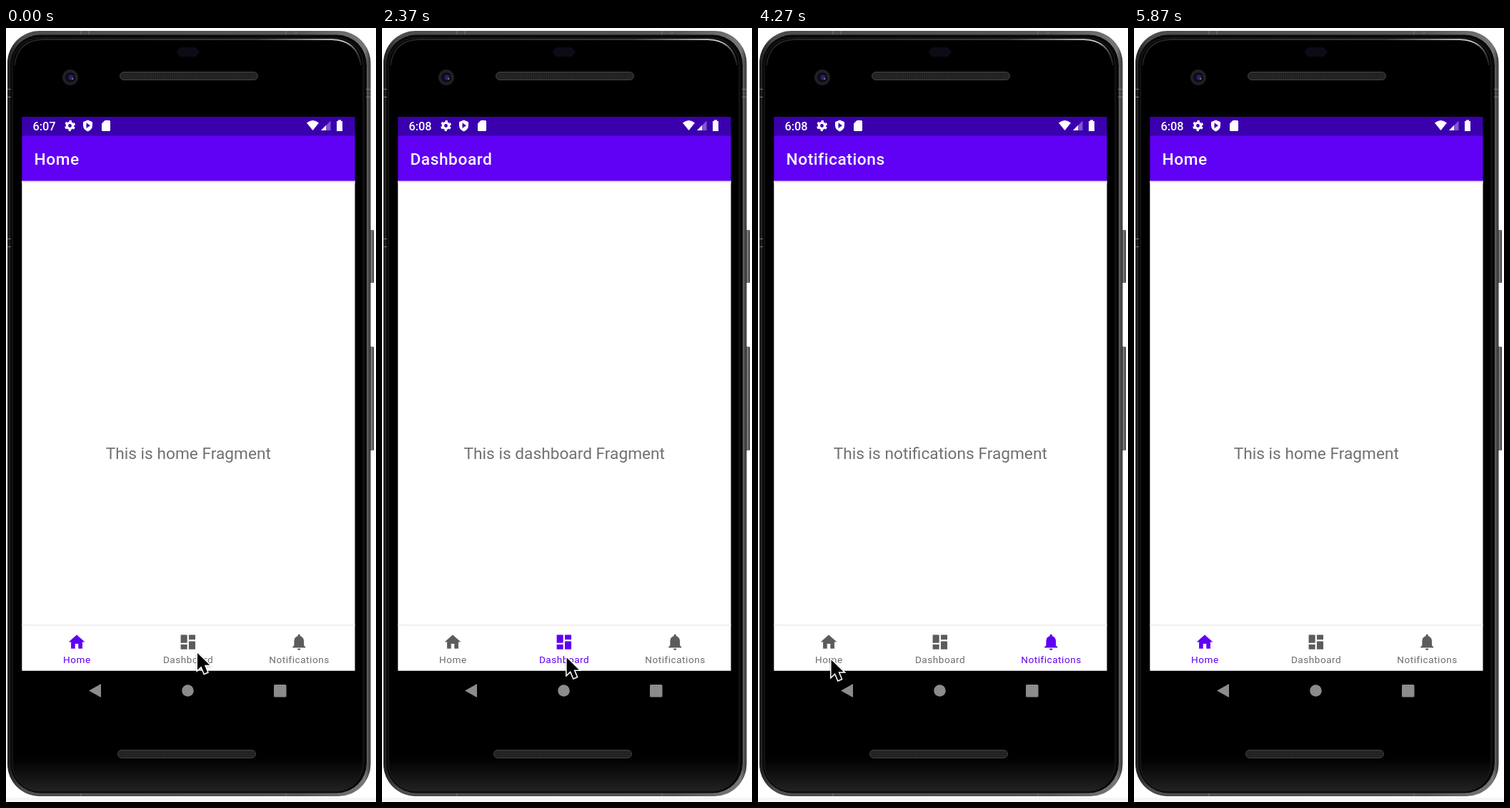
An HTML page that plays this animation: 518 by 1081 pixels, repeating every 5.91 s.

```html
<!DOCTYPE html>
<html lang="en">
<head>
<meta charset="utf-8">
<title>Bottom navigation</title>
<style>
html, body { margin: 0; width: 100%; height: 100%; overflow: hidden; background: #fff; }
svg { display: block; width: 518px; height: 1081px; }
text { font-family: Roboto, sans-serif; }
.title { font-size: 22.7px; font-weight: 500; letter-spacing: .55px; fill: #fff; }
.clock { font-size: 16.3px; font-weight: 500; fill: #fff; }
.body text { font-size: 22.7px; fill: #717171; text-anchor: middle; }
.tab text { font-size: 13.6px; letter-spacing: .52px; text-anchor: middle; }
</style>
</head>
<body>
<svg viewBox="0 0 518 1081">
  <defs>
    <linearGradient id="rim">
      <stop offset="0" stop-color="#1c1c1c"/>
      <stop offset=".04" stop-color="#4c4c4c"/>
      <stop offset=".8" stop-color="#555"/>
      <stop offset=".985" stop-color="#777"/>
      <stop offset="1" stop-color="#333"/>
    </linearGradient>
    <linearGradient id="shine">
      <stop offset="0" stop-color="#222"/>
      <stop offset=".7" stop-color="#3c3c3c"/>
      <stop offset=".95" stop-color="#c4c4c4"/>
      <stop offset="1" stop-color="#222"/>
    </linearGradient>
    <linearGradient id="key">
      <stop offset="0" stop-color="#222"/>
      <stop offset=".6" stop-color="#888"/>
      <stop offset="1" stop-color="#222"/>
    </linearGradient>
    <linearGradient id="haze" x2="0" y2="1">
      <stop offset=".955" stop-color="#000"/>
      <stop offset="1" stop-color="#222"/>
    </linearGradient>
    <linearGradient id="shade" x2="0" y2="1">
      <stop offset="0" stop-color="#d4d4da"/>
      <stop offset="1" stop-color="#fff"/>
    </linearGradient>
    <pattern id="mesh" width="3" height="3" patternUnits="userSpaceOnUse">
      <rect width="3" height="3" fill="#282828"/>
      <path d="M0 0h1.5v1.5H0z" fill="#151515"/>
    </pattern>
    <clipPath id="bar"><path d="M22.300 835h466.200v63H22.300z"/></clipPath>
    <filter id="soft" x="-50%" y="-50%" width="200%" height="200%">
      <feDropShadow dx="0" dy="1" stdDeviation="1" flood-opacity=".35"/>
    </filter>
  </defs>

  <!-- phone -->
  <path d="M0 1075h518v6H0z" fill="#f5f5f5"/>
  <rect x="508" y="282" width="7" height="74" rx="1.5" fill="url(#key)"/>
  <rect x="508" y="445" width="7" height="145" rx="1.5" fill="url(#key)"/>
  <rect x="2" y="4" width="508.500" height="1069" rx="45" fill="url(#rim)"/>
  <rect x="6" y="9.500" width="499" height="1059" rx="42" fill="#080808"/>
  <path d="M2 85.500h5m-5 11h5m-5 198h5m-5 11h5M504 85.500h6m-6 11h6M105 4v5m11-5v5M392 4v5m14-5v5M105 1069v4m287-4v4" stroke="#777" fill="none"/>
  <rect x="9" y="14" width="491" height="1052" rx="38" fill="url(#haze)" stroke="#222"/>
  <path d="M12 52Q16 17 52 16H456Q492 17 497 52" stroke="url(#shine)" stroke-width="1.800" fill="none"/>
  <path d="M244 27h21l6 6-5 7h-23l-5-7z" fill="#0b0c15"/>
  <circle cx="90" cy="69" r="11" fill="#202024"/>
  <circle cx="90" cy="69" r="7" fill="#0c0c1c"/>
  <circle cx="91" cy="69" r="3.500" fill="#25255c"/>
  <circle cx="93" cy="71" r="1.200" fill="#77779c"/>
  <g fill="url(#mesh)" stroke="#414141">
    <rect x="159.500" y="61.500" width="193" height="11" rx="5.500"/>
    <rect x="156.500" y="1008.500" width="193" height="11" rx="5.500"/>
  </g>
  <g fill="#8c8c8c">
    <path d="M116 925.500l17-9.500v19z"/>
    <circle cx="254.500" cy="925.500" r="8.300"/>
    <rect x="375" y="917" width="17.500" height="17.500" rx="1.500"/>
  </g>

  <!-- screen -->
  <path d="M22.300 213h466.200v684.800H22.300z" fill="#fff"/>
  <path d="M22.300 213h466.200v4H22.300z" fill="url(#shade)"/>
  <path d="M22.300 150h466.200v63.400H22.300z" fill="#6000f4"/>
  <path d="M22.300 124h466.200v26.400H22.300z" fill="#3a00ae"/>
  <text class="clock" id="clock" x="37.500" y="142.500"></text>
  <g fill="none" stroke="#fff">
    <circle cx="89.500" cy="136.500" r="4.100" stroke-width="3.400"/>
    <circle cx="89.500" cy="136.500" r="6.200" stroke-width="2.600" stroke-dasharray="3.250 3.243" transform="rotate(15 89.500 136.500)"/>
  </g>
  <g fill="#fff">
    <path d="M114.500 128.500l6.500 2.800v4.700q0 6-6.500 8.500-6.500-2.500-6.500-8.500v-4.700z"/>
    <path d="M112.500 132.500l5.500 3.700-5.500 3.700z" fill="#3a00ae"/>
    <path d="M138.500 129h6q1.500 0 1.500 1.500v12q0 1.500-1.500 1.500h-9q-1.500 0-1.500-1.500v-9z"/>
    <path d="M421 132.500q8.500-7 17 0l-8.500 10.500z"/>
    <path d="M454.500 129.500v13.500H441z" opacity=".35"/>
    <path d="M448 136v7h-7z"/>
    <path d="M465 130v-1.500h4v1.500h2v14h-8v-14z"/>
  </g>
  <text class="title" id="title" x="39.500" y="190.500"></text>
  <g class="body" id="bodies"></g>
  <path d="M22.300 833h466.200v2H22.300z" fill="#f0f0f0"/>
  <g clip-path="url(#bar)"><circle id="ripple"/></g>
  <g id="tabs"></g>

  <path id="cursor" d="M1.500 2.500v23.500l5.400-5 4.200 10 4.400-1.900-4.100-9.800h7.300z" stroke="#fff" stroke-width="3" paint-order="stroke" filter="url(#soft)"/>
</svg>
<script>
const LOOP = 5910, ACTIVE = '#6000f4';
const $ = id => document.getElementById(id);

const tabs = [
  { name: 'Home', x: 99, icon: 'M10 20v-6h4v6h5v-8h3L12 3 2 12h3v8z' },
  { name: 'Dashboard', x: 254.8, icon: 'M3 13h8V3H3zm0 8h8v-6H3zm10 0h8V11h-8zm0-18v6h8V3z' },
  { name: 'Notifications', x: 410.2, icon: 'M12 22c1.1 0 2-.9 2-2h-4c0 1.1.9 2 2 2zm6-6v-5c0-3.07-1.64-5.64-4.5-6.32V4c0-.83-.67-1.5-1.5-1.5s-1.5.67-1.5 1.5v.68C7.63 5.36 6 7.92 6 11v5l-2 2v1h16v-1z' }
];
const taps = [
  { at: 1620, tab: 1, x: 246, y: 864 },
  { at: 2932, tab: 2, x: 413, y: 859 },
  { at: 4590, tab: 0, x: 105, y: 880 }
];
// cursor way points: time, x, y
const path = [
  [0, 266.5, 870.5], [630, 266.5, 870.5], [1070, 245, 864], [2230, 245, 864], [2320, 239, 873],
  [2520, 310, 889], [2800, 413.5, 857], [3200, 413.5, 857], [3400, 266.5, 870.5], [3430, 266.5, 870.5],
  [3720, 150, 886], [4000, 104, 882], [4130, 101, 880], [4270, 101, 880],
  [4370, 105, 880], [4980, 105, 880], [5070, 138, 876], [5130, 114, 867],
  [5170, 130, 866], [5300, 473, 854], [5800, 473, 854], [5870, 496, 861]
];

$('tabs').innerHTML = tabs.map(b => `<g class="tab">
  <path d="${b.icon}" transform="translate(${b.x - 13.6} 844) scale(1.135)"/>
  <text x="${b.x + .3}" y="887">${b.name}</text></g>`).join('');
$('bodies').innerHTML = tabs.map(b =>
  `<text x="255.3" y="601.5">This is ${b.name.toLowerCase()} Fragment</text>`).join('');

const clamp = v => Math.max(0, Math.min(1, v));
const smooth = v => v * v * (3 - 2 * v);
const mix = (a, b, k) => a + (b - a) * k;
const set = (el, attrs) => { for (const k in attrs) el.setAttribute(k, attrs[k]); };

function drawTabs(t) {
  let now = 0, before = 0, fade = 1;
  for (const tap of taps) {
    const age = t - tap.at - 110;
    if (age < 0) break;
    before = now;
    now = tap.tab;
    fade = clamp(age / 100);
  }
  $('title').textContent = tabs[now].name;
  tabs.forEach((b, i) => {
    const [icon, label] = $('tabs').children[i].children;
    set(icon, { fill: i === now ? ACTIVE : '#5c5c5c' });
    set(label, { fill: i === now ? ACTIVE : '#6c6c6c' });
    set($('bodies').children[i], { opacity: i === now ? fade : i === before ? 1 - fade : 0 });
  });
}

function drawRipple(t) {
  const tap = taps.find(p => t >= p.at && t < p.at + 450);
  if (!tap) return set($('ripple'), { opacity: 0 });
  const age = t - tap.at, k = smooth(clamp(age / 225));
  set($('ripple'), {
    cx: mix(tap.x, tabs[tap.tab].x, k),
    cy: mix(tap.y, 866, k),
    r: mix(47, 84, k),
    opacity: .19 * clamp(age / 75) * clamp((450 - age) / 240)
  });
}

function drawCursor(t) {
  const i = path.findIndex(p => p[0] > t);
  set($('cursor'), { visibility: i < 0 ? 'hidden' : 'visible' });
  if (i < 0) return;
  const [t0, x0, y0] = path[i - 1], [t1, x1, y1] = path[i];
  const k = (t - t0) / (t1 - t0);
  set($('cursor'), { transform: `translate(${mix(x0, x1, k)} ${mix(y0, y1, k)})` });
}

function frame() {
  const t = performance.now() % LOOP;
  $('clock').textContent = t < 30 ? '6:07' : '6:08';
  drawTabs(t);
  drawRipple(t);
  drawCursor(t);
  requestAnimationFrame(frame);
}
frame();
</script>
</body>
</html>
```
